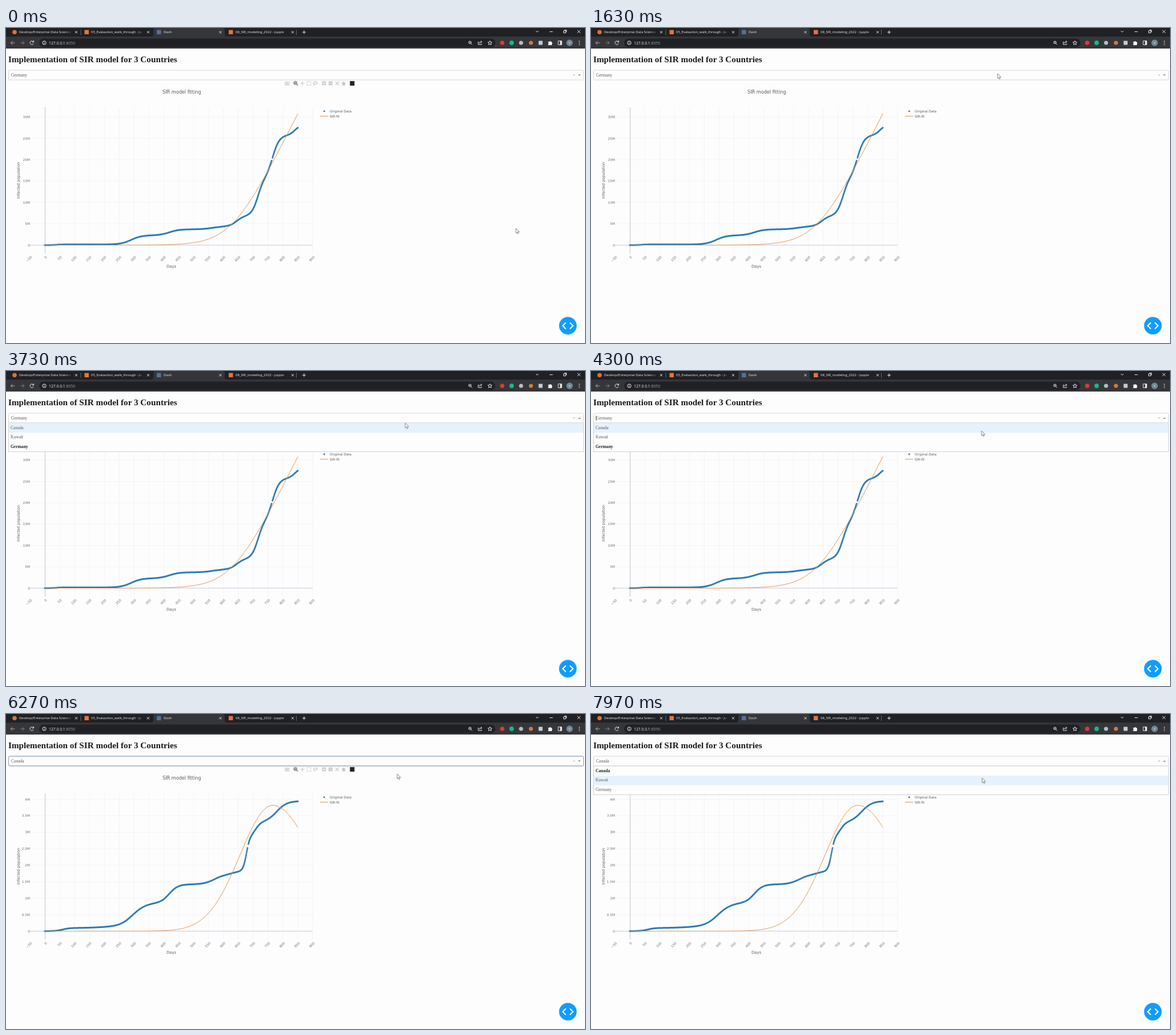
An HTML page that plays this animation: 1014 by 552 pixels, repeating every 8 s.

```html
<!DOCTYPE html>
<html lang="en">
<head>
<meta charset="utf-8">
<title>Dash</title>
<style>
  html, body { margin: 0; width: 100%; height: 100%; overflow: hidden; background: #fdfdfe; }
  svg { display: block; }
  .ui { font-family: "Open Sans", "Noto Sans", sans-serif; font-size: 5.95px; fill: #f1f3f4; }
  .page { font-family: "Liberation Serif", "Times New Roman", serif; font-size: 7.55px; fill: #5c5c5c; }
  .page .bold { font-weight: bold; fill: #222; }
  .chart { font-family: "DejaVu Sans", Verdana, sans-serif; font-size: 5.8px; fill: #707070; }
  .chart .label { fill: #5a5a5a; }
  .line { fill: none; stroke: #e8eaed; stroke-width: 1; }
  .grid { stroke: #f1f1f6; stroke-width: .8; fill: none; }
  .data { fill: none; stroke: #2c7cb2; stroke-width: 3; stroke-linecap: round; }
  .fit { fill: none; stroke: #e0954e; stroke-width: 1; }
  .tool { fill: none; stroke: #c9c9ce; stroke-width: 1.2; }

  .step { animation: 8s step-end infinite; }
  .menu { animation-name: menu; }
  .before { animation-name: before; }
  .after { animation-name: after; }
  .old { animation-name: old; }
  .new { animation-name: new; }
  .busy { animation-name: busy; }
  .idle { animation-name: idle; }
  .focus { animation-name: focus; }
  .hover { animation-name: hover; }
  .arrow { animation-name: arrow; }
  .beam { animation-name: beam; }
  .caret { animation: blink 1s -.9s step-end infinite; }
  .modebar { animation: modebar 8s linear infinite; }
  .mouse { animation: mouse 8s ease-in-out infinite; }

  @keyframes menu { 0%, 58.75% { opacity: 0 } 26.25%, 91.25%, 100% { opacity: 1 } }
  @keyframes before { 0% { opacity: 1 } 58.75%, 100% { opacity: 0 } }
  @keyframes after { 0% { opacity: 0 } 58.75%, 100% { opacity: 1 } }
  @keyframes old { 0% { opacity: 1 } 77.5%, 100% { opacity: 0 } }
  @keyframes new { 0% { opacity: 0 } 77.5%, 100% { opacity: 1 } }
  @keyframes busy { 0%, 77.5%, 100% { opacity: 0 } 58.75% { opacity: 1 } }
  @keyframes idle { 0%, 77.5%, 100% { opacity: 1 } 58.75% { opacity: 0 } }
  @keyframes focus { 0%, 91.25%, 100% { opacity: 0 } 58.75% { opacity: 1 } }
  @keyframes hover {
    0% { transform: translateY(33.4px) }
    46.6% { transform: none }
    95%, 100% { transform: translateY(16.7px) }
  }
  @keyframes arrow { 0%, 46.6%, 93.6%, 100% { opacity: 1 } 26.25%, 91.25% { opacity: 0 } }
  @keyframes beam { 0%, 46.6%, 93.6%, 100% { opacity: 0 } 26.25%, 91.25% { opacity: 1 } }
  @keyframes blink { 0% { opacity: 1 } 50%, 100% { opacity: 0 } }
  @keyframes modebar {
    0%, 16.5% { opacity: 1 }
    19.5%, 58.75% { opacity: 0 }
    62.5%, 87.5% { opacity: 1 }
    91%, 100% { opacity: 0 }
  }
  @keyframes mouse {
    0%, 4% { transform: translate(893px, 351px) }
    18%, 24% { transform: translate(712px, 80px) }
    26%, 43% { transform: translate(713px, 79px) }
    50.5%, 54% { transform: translate(684px, 105px) }
    56%, 83% { transform: translate(685px, 105px) }
    86.25% { transform: translate(688px, 93px) }
    88.5%, 92% { transform: translate(688px, 82px) }
    96.5%, 100% { transform: translate(685px, 112px) }
  }
</style>
</head>
<body>
<svg width="1014" height="552" viewBox="0 0 1014 552">
  <defs>
    <linearGradient id="fade"><stop offset="0" stop-color="#202124" stop-opacity="0"/><stop offset="1" stop-color="#202124"/></linearGradient>
  </defs>
  <rect width="1014" height="552" fill="#fdfdfe"/>

  <g class="ui">
    <rect width="1014" height="16" fill="#202124"/>
    <path d="M254 15Q258 15 258 11V4Q258 0 262 0H379Q383 0 383 4V11Q383 15 387 15H1014V36H0V15Z" fill="#35363a"/>
    <rect x="58" y="18.5" width="799" height="15" rx="7.5" fill="#202124"/>
    <circle cx="15" cy="7.3" r="3.8" fill="#df7135"/>
    <rect x="137.5" y="3.5" width="7.5" height="7.5" fill="#e97531"/>
    <rect x="264" y="3.5" width="7.5" height="7.5" fill="#53719a"/>
    <rect x="390" y="3.5" width="7.5" height="7.5" fill="#e8703b"/>
    <text x="23" y="9.3">Desktop/Enterprise Data Science</text>
    <text x="149" y="9.3">05_Evalaution_walk_through - Ju</text>
    <text x="276" y="9.3" class="step idle">Dash</text>
    <text x="276" y="9.3" class="step busy">Updating...</text>
    <text x="402" y="9.3">08_SIR_modeling_2022 - Jupyte</text>
    <g id="fades" fill="url(#fade)"></g>
    <path id="closers" class="line"/>
    <path class="line" stroke-opacity=".35" d="M131 3V12M508.5 3V12"/>
    <path class="line" d="M519 7.3h6m-3 -3v6M928 5l2.3 2.3l2.3 -2.3M952 6.5h5.5M976.5 4.8h3.8v3.8h-3.8zM978 3.5h3.6v3.8M1000.7 3.7l5.2 5.2m0 -5.2l-5.2 5.2"/>

    <path class="line" stroke-opacity=".65" d="M15.5 26h-7m3.2 -3.3l-3.3 3.3l3.3 3.3"/>
    <path class="line" stroke-opacity=".4" d="M25 26h7m-3.2 -3.3l3.3 3.3l-3.3 3.3"/>
    <path class="line" d="M47.8 24A3.2 3.2 0 1 0 48.2 27.2M48.5 22v2.7h-2.8"/>
    <circle class="line" cx="67" cy="26" r="3.2"/>
    <path class="line" d="M67 25.6v2.4M67 23.8v.9"/>
    <text x="75" y="28.5" font-size="6.8">127.0.0.1<tspan fill="#9aa0a6">:8050</tspan></text>
    <g class="line">
      <circle cx="812.5" cy="25.3" r="2.2"/><path d="M814.2 27l2.3 2.3M811.4 25.3h2.2"/>
      <path d="M828.5 24.5H827V29h6v-1.5M829 27Q829.3 24.4 832.8 24.2M831.5 22.5l1.9 1.7l-1.9 1.8"/>
      <path d="M847.5 22.3l1 2.5l2.7 .2l-2 1.8l.6 2.6l-2.3 -1.4l-2.3 1.4l.6 -2.6l-2 -1.8l2.7 -.2z"/>
      <path d="M967 22.7h6v6.6h-6z"/>
    </g>
    <circle cx="869" cy="26" r="3.8" fill="#dd3a33"/>
    <circle cx="885.5" cy="26" r="3.9" fill="#15b98c"/>
    <circle cx="902" cy="26" r="3.6" fill="#b9bcc0"/>
    <circle cx="919.3" cy="26" r="3.6" fill="#d5783c"/>
    <rect x="932.7" y="22.5" width="7" height="7" fill="#c9cbce"/>
    <path d="M949.5 24h2.2a1.3 1.3 0 0 1 2.5 0h1.8v1.8a1.3 1.3 0 0 1 0 2.4v1.8h-6.5v-2a1.2 1.2 0 0 0 0 -2.2z"/>
    <rect x="970.5" y="22.5" width="2.8" height="7"/>
    <circle cx="987" cy="26" r="5.7" fill="#6f8794"/>
    <text x="987" y="28.2" text-anchor="middle">V</text>
    <path d="M1003.4 22.6h1.4v1.4h-1.4zm0 2.8h1.4v1.4h-1.4zm0 2.8h1.4v1.4h-1.4z"/>
  </g>

  <g class="chart">
    <text class="label" x="274" y="114.8" font-size="8.15">SIR model fitting</text>
    <path id="columns" class="grid"/>
    <g id="days"></g>
    <text class="label" x="281" y="420.3" font-size="6.8">Days</text>
    <text class="label" transform="translate(23.5 299) rotate(-90)" font-size="6.6">Infected population</text>
    <g id="germany" class="step old"></g>
    <g id="canada" class="step new"></g>
    <path class="data" d="M557.3 145.7h0"/>
    <path class="fit" d="M550 154.5h14.5"/>
    <text class="label" x="567" y="147.8" font-size="5.75">Original Data</text>
    <text class="label" x="567" y="156.6" font-size="5.75">SIR-fit</text>
  </g>

  <g class="modebar">
    <g class="tool">
      <rect x="489" y="94.8" width="6.6" height="5"/><circle cx="492.3" cy="97.3" r="1.1"/>
      <path d="M515.5 97h7M519 93.5v7"/>
      <rect x="527.3" y="93.7" width="6.4" height="6.6" stroke-dasharray="1.4 1"/>
      <ellipse cx="542" cy="96.4" rx="3.2" ry="2.1"/><path d="M540 98l-.5 2.5"/>
      <path d="M577 94l6 6m0 -6l-6 6"/>
    </g>
    <path d="M553.7 93.5h6.6v6.8h-6.6zM565 93.5h6.6v6.8h-6.6zM587.6 97.3l3.8 -3.8l3.8 3.8h-1.2v3.2h-5.2v-3.2z" fill="#c9c9ce"/>
    <path d="M555 97h4m-2 -2v4M566.3 97h4" stroke="#fdfdfe"/>
    <path class="tool" style="stroke:#777" d="M504.2 96.3a2.6 2.6 0 1 0 5.2 0a2.6 2.6 0 1 0 -5.2 0M508.8 98.3l2.5 2.4M505.4 96.3h2.8m-1.4 -1.4v2.8"/>
    <rect x="602.3" y="93" width="8" height="8" fill="#25262b"/>
  </g>

  <g class="page">
    <text x="4" y="60" font-size="15.22" font-weight="bold" fill="#1a1a1a">Implementation of SIR model for 3 Countries</text>
    <rect x="4.5" y="74" width="1007" height="17" rx="2" fill="#fdfdfe" stroke="#d6d6d6"/>
    <rect class="step focus" x="4.5" y="74" width="1007" height="17" rx="2" fill="none" stroke="#8496c6"/>
    <text class="step before" x="9" y="85.2">Germany</text>
    <text class="step after" x="9" y="85.2">Canada</text>
    <path d="M993.6 81l2.8 2.8m0 -2.8l-2.8 2.8" stroke="#aaa" stroke-width=".7"/>
    <path d="M1001.6 81.2h5.2l-2.6 2.8z" fill="#999"/>
    <g class="step menu">
      <rect x="1000" y="79" width="9" height="8" fill="#fdfdfe"/>
      <path d="M1001.6 84h5.2l-2.6 -2.8z" fill="#999"/>
      <rect x="4.5" y="91" width="1007" height="50.4" fill="#fdfdfe" stroke="#d2d2d6"/>
      <rect class="step hover" x="5" y="91.4" width="1006" height="16.7" fill="#e5f1fd"/>
      <g class="step before"><text x="8" y="101.6">Canada</text><text class="bold" x="8" y="135">Germany</text></g>
      <g class="step after"><text class="bold" x="8" y="101.6">Canada</text><text x="8" y="135">Germany</text></g>
      <text x="8" y="118.3">Kuwait</text>
      <path class="caret" d="M9 78.5V87" stroke="#222" stroke-width=".8"/>
    </g>
  </g>

  <circle cx="984" cy="521.7" r="15.4" fill="#119dff"/>
  <path d="M980.5 516.2l-5.5 5.5l5.5 5.5M987.5 516.2l5.5 5.5l-5.5 5.5" fill="none" stroke="#fff" stroke-width="2"/>

  <g class="mouse">
    <path class="step arrow" d="M0 0V8.4L2 6.7L3.3 9.6L4.6 9L3.3 6.2H6Z" fill="#fff" stroke="#555" stroke-width=".7"/>
    <path class="step beam" d="M-1.8 -3.5h3.6M0 -3.5v8M-1.8 4.5h3.6" fill="none" stroke="#555" stroke-width=".8"/>
  </g>
</svg>
<script>
  const $ = id => document.getElementById(id);
  const ZERO = 380.5, LEFT = 42, RIGHT = 537, LAST_DAY = 850;
  const dayX = day => 68 + day * 0.5212;

  // Each wave of infections is a logistic step: [height, centre, width]
  const cumulative = waves => x =>
    waves.reduce((sum, [h, c, w]) => sum + h / (1 + Math.exp((c - x) / w)), 0);
  const bell = (h, c, rise, fall) => x =>
    h * Math.exp(-(((x - c) / (x < c ? rise : fall)) ** 2) / 2);
  const ramp = (slope, c, w) => x => slope * w * Math.log1p(Math.exp((x - c) / w));

  function plot(id, { top, every, spacing, cases, gap, fit }) {
    const point = (day, f) => `${dayX(day).toFixed(2)} ${(ZERO - f(dayX(day))).toFixed(2)}`;
    let rows = '', labels = '', dots = '', line = [];
    for (let n = 0; n * every <= top; n++) {
      const y = ZERO - n * spacing;
      if (n) rows += `M${LEFT + 3} ${y}H${RIGHT}`;
      labels += `<text x="42" y="${y + 2}" text-anchor="end">${n ? n * every + 'M' : 0}</text>`;
    }
    for (let day = 0; day <= LAST_DAY; day++) {
      if (Math.abs(dayX(day) - gap) > 0.6) dots += `M${point(day, cases)}h0`;
      if (day % 5 === 0) line.push(point(day, fit));
    }
    $(id).innerHTML = `${labels}<path class="grid" d="${rows}"/>
      <path d="M${LEFT} ${ZERO}H${RIGHT}" stroke="#cbc8dd"/>
      <path d="M68.5 139V395" stroke="#c4c4c8"/>
      <path class="data" d="${dots}"/>
      <path class="fit" d="M${line.join('L')}"/>`;
  }

  let columns = '', days = '';
  for (let day = -50; day <= 900; day += 50) {
    const x = dayX(day);
    if (day > 0) columns += `M${x} 139V395`;
    days += `<text transform="translate(${x + 4} 402) rotate(-45)" text-anchor="end">${String(day).replace('-', '−')}</text>`;
  }
  $('columns').setAttribute('d', columns);
  $('days').innerHTML = days;

  const tabEnds = [123, 249, 375.5, 502];
  $('closers').setAttribute('d', tabEnds.map(x => `M${x - 2} 5.3l4 4m0 -4l-4 4`).join(''));
  $('fades').innerHTML = tabEnds.filter((x, i) => i !== 2)
    .map(x => `<rect x="${x - 19}" y="2" width="12" height="11"/>`).join('');

  plot('germany', {
    top: 30, every: 5, spacing: 37.37, gap: 466,
    cases: cumulative([[1.2, 88, 4], [16, 219, 9], [10.5, 286, 8.5], [5, 361, 9],
      [19, 404, 6.5], [65, 441, 5.5], [76, 467, 6], [18, 506, 5]]),
    fit: ramp(2, 396.3, 27.3)
  });
  plot('canada', {
    top: 4, every: 0.5, spacing: 28.87, gap: 423.7,
    cases: cumulative([[5.5, 99, 6], [2, 160, 15], [42, 222, 11.5], [32.5, 286, 7.5], [17, 364, 9],
      [6, 396, 7], [60, 421, 3], [26, 437, 5], [37, 474, 9]]),
    fit: bell(220.5, 467, 57, 71)
  });
</script>
</body>
</html>
```
